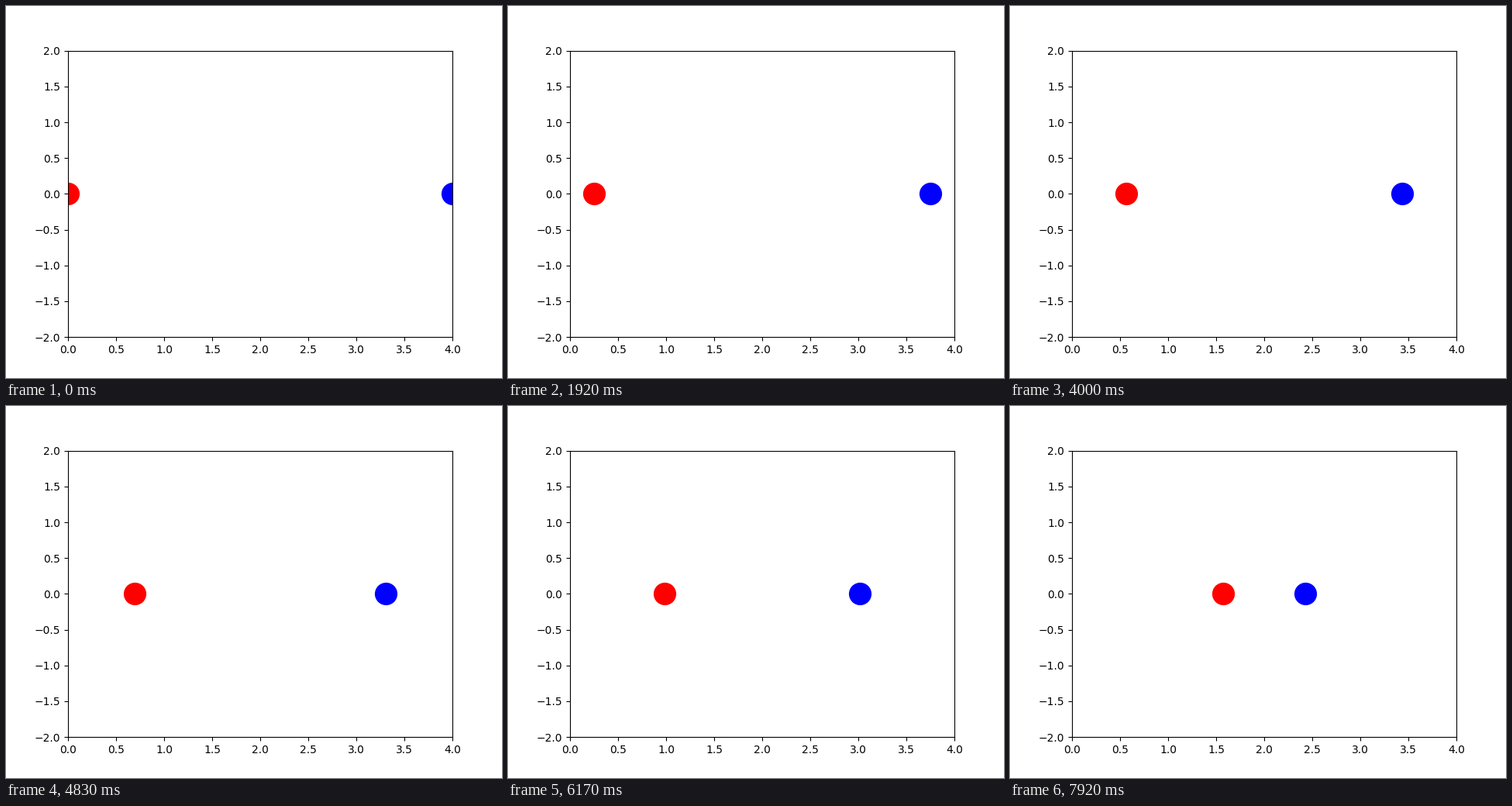
A matplotlib script that plays this animation: 640x480 px, repeating every 8000 ms.

```python
import math

import matplotlib.pyplot as plt
from matplotlib.animation import FuncAnimation

FRAMES = 96
LOOP_MS = 8000
HALF = 2.0      # half the starting distance
RATE = 0.0402   # loss of the squared half distance per frame

fig, ax = plt.subplots(figsize=(6.4, 4.8), dpi=100)
ax.set_xlim(0, 4)
ax.set_ylim(-2, 2)

red, = ax.plot([], [], "o", color="#ff0000", markersize=20)
blue, = ax.plot([], [], "o", color="#0000ff", markersize=20)


def update(k):
    # each speed is inversely proportional to the remaining distance
    gap = math.sqrt(HALF ** 2 - RATE * k)
    red.set_data([HALF - gap], [0])
    blue.set_data([HALF + gap], [0])
    return red, blue


def reset():
    return update(0)


anim = FuncAnimation(fig, update, frames=FRAMES, init_func=reset,
                     interval=LOOP_MS / FRAMES, repeat=True, repeat_delay=0)
plt.show()
```
